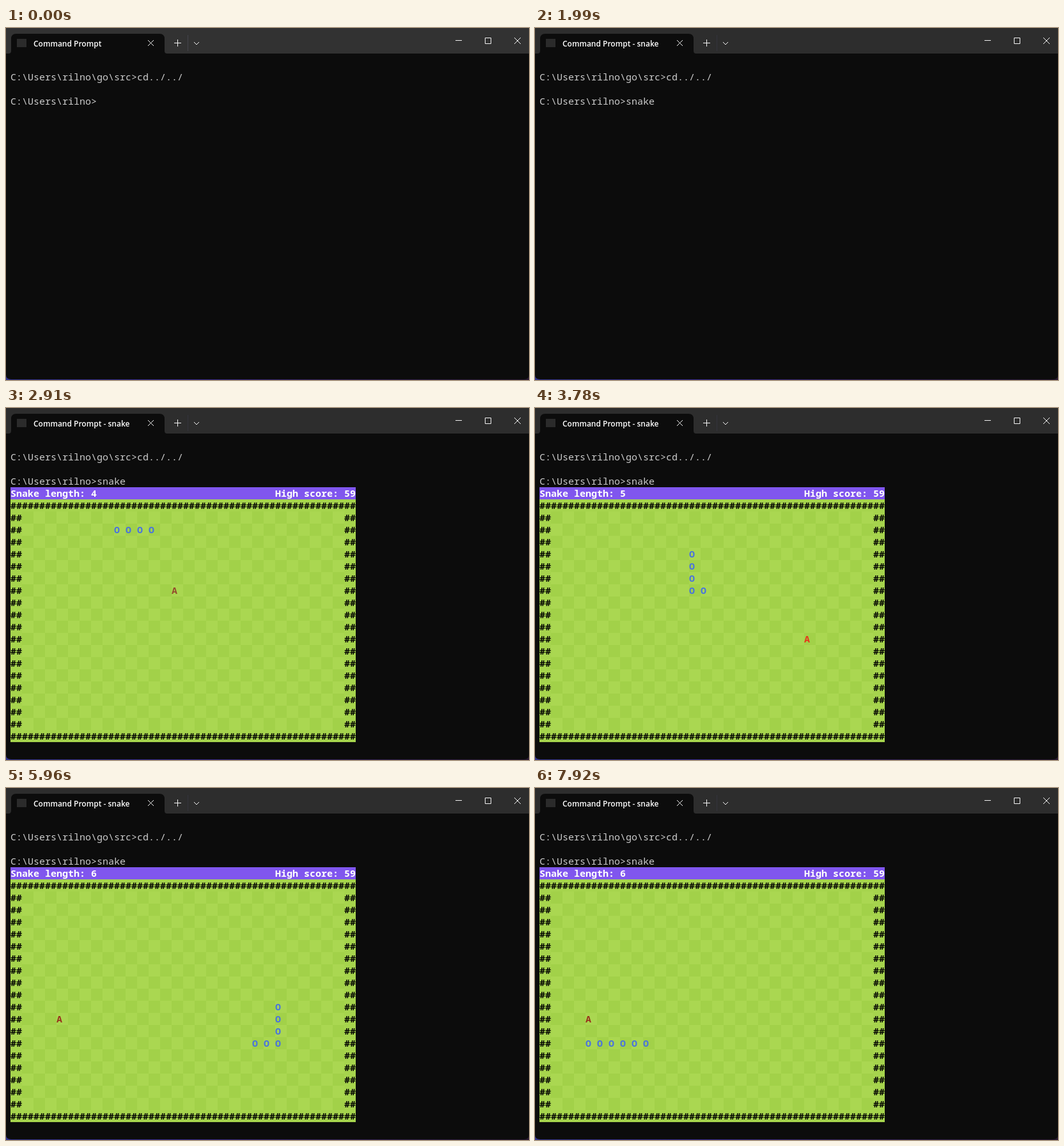
Recreate the animation shown at these times as an HTML page. Size 818 by 551 pixels, loop 8000 ms.

```html
<!DOCTYPE html>
<html lang="en">
<head>
<meta charset="utf-8">
<title>Terminal snake</title>
<style>
html, body { margin: 0; width: 100%; height: 100%; overflow: hidden; background: #0c0c0c; }
svg { display: block; width: 818px; height: 551px; }
text { white-space: pre; }
.mono { font: 500 15px "Noto Sans Mono", "DejaVu Sans Mono", monospace; fill: #cccccc; }
.bold { font-weight: 600; }
.title { font: 600 12px "Open Sans", "Noto Sans", sans-serif; fill: #fff; }
.line { fill: none; stroke: #f2f2f2; stroke-width: 1; }
</style>
</head>
<body>
<svg id="stage" viewBox="0 0 818 551">
  <defs>
    <linearGradient id="edge">
      <stop offset="0" stop-color="#34348c"/>
      <stop offset=".35" stop-color="#3c2c94"/>
      <stop offset=".6" stop-color="#3a2660"/>
      <stop offset="1" stop-color="#2a1a30"/>
    </linearGradient>
  </defs>
  <rect width="818" height="551" fill="#0c0c0c"/>
  <rect id="bar" width="818" height="40"/>
  <path d="M0 40H4Q8 40 8 36V17Q8 9 16 9H240Q248 9 248 17V36Q248 40 252 40Z" fill="#0c0c0c"/>
  <rect x="17" y="17" width="15" height="13" fill="#2b2b2b"/>
  <text id="title" class="title" x="43" y="29"></text>
  <path class="line" d="M222 19L231 28M231 19L222 28M263 23.5H274M268.5 18V29M294 22L298 26L302 22"/>
  <path class="line" d="M703 19.5H713M749.5 15.5H758.5V24.5H749.5ZM795 15L805 25M805 15L795 25"/>
  <path id="divider" d="M284.5 11V36" fill="none"/>
  <path d="M0 543Q0 550 8 550H810Q818 550 818 543V551H0Z" fill="url(#edge)"/>
  <text class="mono" x="7" y="82">C:\Users\rilno\go\src>cd../../</text>
  <text id="prompt" class="mono" x="7" y="120"></text>
  <g id="game"></g>
  <path id="pointer" d="M0 0L23 23H13.5L18 34L12.5 36.5L8 26L0 33Z" fill="#fff" stroke="#000" stroke-width=".6"/>
</svg>
<script>
const LOOP = 8000, LEFT = 7, TOP = 143, CELL_W = 18, CELL_H = 19, COLS = 30, ROWS = 20;
const byId = id => document.getElementById(id);
const game = byId('game');

function add(tag, attrs, text = '') {
  const node = document.createElementNS('http://www.w3.org/2000/svg', tag);
  for (const key in attrs) node.setAttribute(key, attrs[key]);
  node.textContent = text;
  return game.appendChild(node);
}
const write = (x, top, fill, text) =>
  add('text', { x, y: top + 15, class: 'mono bold', style: `fill:${fill}` }, text);
const show = (node, on) => node.setAttribute('visibility', on ? 'visible' : 'hidden');

// Board
const width = COLS * CELL_W;
add('rect', { x: LEFT, y: TOP - CELL_H, width, height: CELL_H, fill: '#8056ee' });
add('rect', { x: LEFT, y: TOP, width, height: ROWS * CELL_H, fill: '#a6d44d' });
for (let row = 1; row < ROWS - 1; row++) {
  for (let col = 1; col < COLS - 1; col++) {
    add('rect', {
      x: LEFT + col * CELL_W, y: TOP + row * CELL_H, width: CELL_W, height: CELL_H,
      fill: (col + row) % 2 ? '#aad751' : '#a2d149'
    });
  }
}
for (let row = 0; row < ROWS; row++) {
  const wall = row % (ROWS - 1) ? '##' + ' '.repeat(56) + '##' : '#'.repeat(60);
  write(LEFT, TOP + row * CELL_H, '#000', wall);
}
const score = write(LEFT, TOP - CELL_H, '#fff', '');
write(LEFT + 46 * 9, TOP - CELL_H, '#fff', 'High score: 59');
const apple = write(0, 0, '#000', 'A');
const body = Array.from({ length: 6 }, () => write(0, 0, '#4a74dc', 'O'));

// Route of the head: [dx, dy, cells], after the four starting cells
const route = [[2, 2], [3, 2], [4, 2], [5, 2]];
for (const [dx, dy, count] of [[1, 0, 8], [0, 1, 5], [1, 0, 10], [0, 1, 6], [-1, 0, 19]]) {
  for (let i = 0; i < count; i++) {
    const [x, y] = route[route.length - 1];
    route.push([x + dx, y + dy]);
  }
}

// Move times: [first, last, moves]
const ticks = [
  [2190, 2190, 1], [2320, 2910, 6], [3060, 3780, 7], [3910, 4700, 8],
  [4900, 5560, 7], [5760, 6480, 7], [6610, 7400, 8], [7530, 7920, 4]
].flatMap(([first, last, n]) =>
  Array.from({ length: n }, (_, i) => first + (last - first) * i / Math.max(1, n - 1)));

const stages = [
  { from: 0, length: 4, cell: [14, 7], fill: '#944a2c' },
  { from: 14, length: 5, cell: [23, 11], fill: '#e8351c' },
  { from: 27, length: 6, cell: [4, 11], fill: '#98321c' }
];

function place(node, [col, row]) {
  node.setAttribute('x', LEFT + col * CELL_W);
  node.setAttribute('y', TOP + row * CELL_H + 15);
}

function drawGame(t) {
  const moves = ticks.filter(tick => t >= tick - 0.01).length;
  const stage = stages.filter(s => moves >= s.from).pop();
  score.textContent = 'Snake length: ' + stage.length;
  place(apple, stage.cell);
  apple.style.fill = stage.fill;
  body.forEach((part, i) => {
    const used = i < stage.length;
    part.style.display = used ? '' : 'none';
    if (used) place(part, route[moves + 3 - i]);
  });
}

function drawPointer(t) {
  const on = t >= 110 && t < 1460;
  show(byId('pointer'), on);
  if (!on) return;
  const p = Math.min(10, Math.floor((t - 110) / 75)) / 10;
  const rest = (1 - p) ** 2;
  byId('pointer').setAttribute('transform', `translate(${693.5 + 29 * rest} ${382.5 + 155 * rest})`);
}

function render(t) {
  const early = t < 110;
  byId('bar').setAttribute('fill', early ? '#323232' : '#2d2d2d');
  byId('divider').setAttribute('stroke', early ? '#44444c' : '#34343c');
  byId('title').textContent = 'Command Prompt' + (t >= 1990 ? ' - snake' : '');
  const typed = t < 1460 ? 0 : 1 + Math.floor((t - 1460) / 100);
  byId('prompt').textContent = 'C:\\Users\\rilno>' + 'snake'.slice(0, typed);
  drawPointer(t);
  const playing = t >= 2060;
  show(game, playing);
  if (playing) drawGame(t);
}

function loop() {
  render(performance.now() % LOOP);
  requestAnimationFrame(loop);
}
loop();
</script>
</body>
</html>
```
